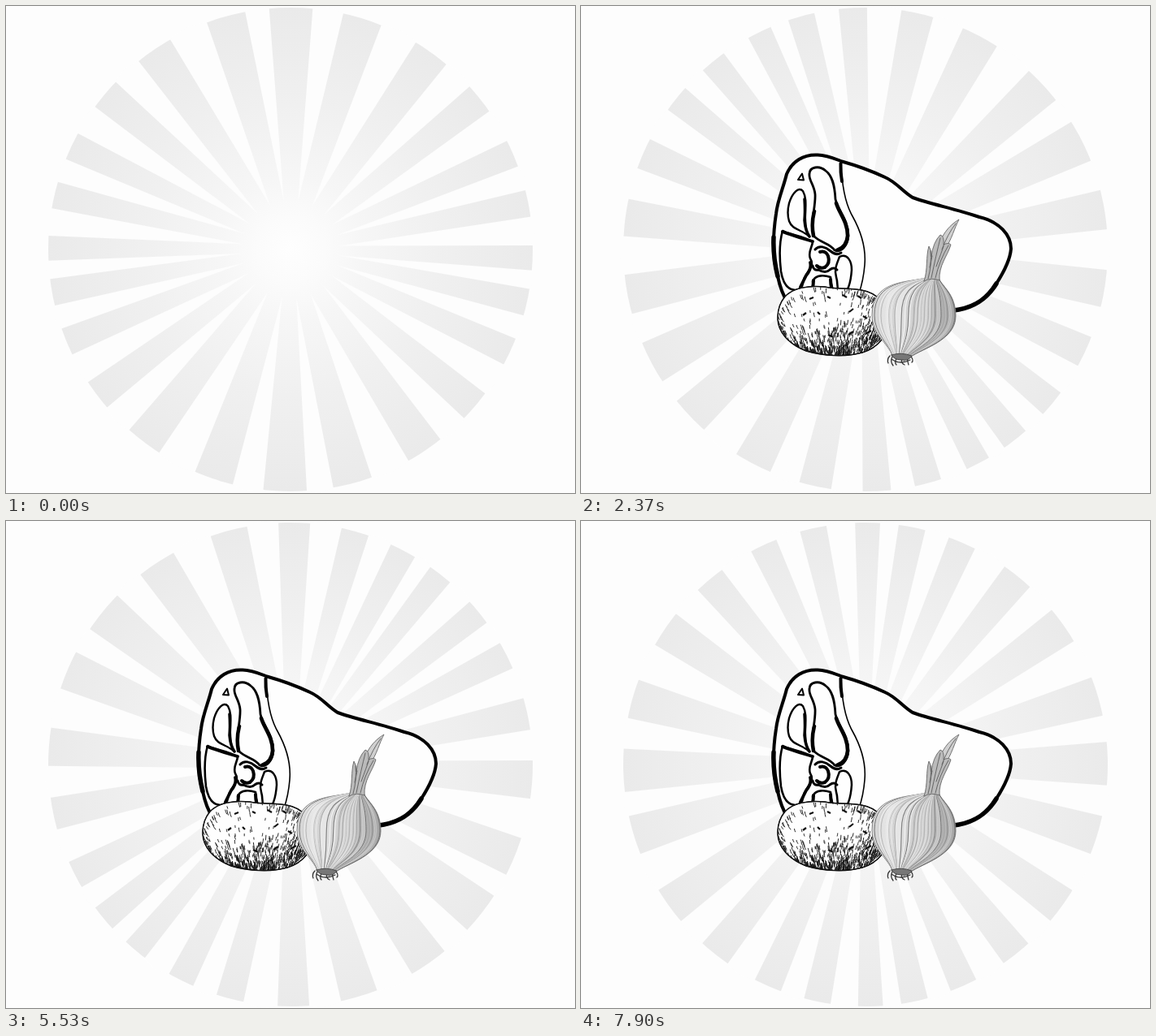
An HTML page for the animation above (8 s loop, 700 by 600 pixels).

```html
<!DOCTYPE html>
<html lang="en">
<head>
<meta charset="utf-8">
<title>Stew ingredients</title>
<style>
html, body { margin: 0; width: 100%; height: 100%; overflow: hidden; background: #fdfdfd; }
svg { display: block; width: 100%; height: 100%; }
</style>
</head>
<body>
<svg viewBox="0 0 700 600">
  <defs>
    <radialGradient id="glow" gradientUnits="userSpaceOnUse" cx="0" cy="0" r="298">
      <stop offset="0" stop-color="#fefefe"/>
      <stop offset=".14" stop-color="#fbfbfb"/>
      <stop offset=".3" stop-color="#f6f6f6"/>
      <stop offset=".6" stop-color="#f0f0f0"/>
      <stop offset="1" stop-color="#eaeaea"/>
    </radialGradient>
    <linearGradient id="skin">
      <stop offset="0" stop-color="#cfcfcf"/>
      <stop offset=".2" stop-color="#ececec"/>
      <stop offset=".5" stop-color="#dedede"/>
      <stop offset=".8" stop-color="#bdbdbd"/>
      <stop offset="1" stop-color="#a0a0a0"/>
    </linearGradient>
    <clipPath id="skinEdge"><path id="spudClip"/></clipPath>
  </defs>

  <g transform="translate(350 300)">
    <g id="burst">
      <circle r="298" fill="url(#glow)"/>
      <path id="gaps" fill="#fdfdfd"/>
    </g>
  </g>

  <g id="ham" fill="none" stroke="#000" stroke-linejoin="round" stroke-linecap="round">
    <path fill="#fefefe" stroke-width="4" d="M290 183.500C301 183 312 188 321 191.500C337 196 357 203 374 211C388 217 396 229 408 236C430 244 461 250 490 260C515 266 529 282 529 299C528 313 520 328 511 342C500 360 486 370 465 374C449 377 431 377 417 383C395 394 374 407 346 409C322 410 298 404 279 392C258 376 247 358 242 333C235 309 236 282 240 256C242 238 249 224 253 207C260 191 274 183 290 183.500Z"/>
    <path stroke-width="5.500" d="M511 342C500 360 486 370 465 374C449 377 431 377 417 383C395 394 374 407 346 409Q324 410 303 404M237 285Q236 309 242 333"/>
    <path stroke-width="1.600" d="M320 193C321 226 326 245 334 259C344 277 351 296 349 319C347 344 339 367 326 385Q316 398 302 404"/>
    <path stroke-width="4" d="M319.500 194Q319 205 321 216"/>
    <path stroke-width="2" d="M267 214L272 206.500L274 214.500Z"/>
    <path stroke-width="2.800" d="M281 207C281 198 293 196 301 203C309 209 312 220 313 238C316 252 329 263 329 283C328 295 321 304 312 301C306 292 297 293 287 284C281 270 289 247 288 232C287 220 280 215 281 207Z"/>
    <path stroke-width="4.500" d="M314 243C318 256 328 266 328 283Q327 297 315 301M286 283Q283 268 287 253"/>
    <path stroke-width="2.400" d="M256 243C260 230 268 222 273 228C279 239 275 250 276 263Q276 277 281 284C271 275 260 276 256 265Q253 255 256 243Z"/>
    <path stroke-width="3.500" d="M275 238Q276 252 275 264Q276 277 281 284"/>
    <path stroke-width="2.600" d="M248 277C260 283 275 283 285 291C284 298 279 303 282 311C287 319 281 324 277 331C270 340 277 347 264 350C253 350 248 339 246 327C244 310 244 291 248 277Z"/>
    <path stroke-width="3.800" d="M248 278Q266 285 285 290M282 316Q284 324 277 332L270 346"/>
    <path stroke-width="3" d="M288 300C293 294 301 297 307 302Q314 308 320 304M285 320Q286 326 292 325Q301 330 306 325Q311 321 315 325"/>
    <path stroke-width="4" d="M294 303Q301 301 304 308Q307 317 300 322Q294 324 290 320"/>
    <path stroke-width="2.500" d="M318 309C328 304 333 315 333 325C332 340 328 353 321 357C313 351 317 343 314 334C311 325 315 317 318 309Z"/>
    <path stroke-width="2.600" d="M285 339C289 330 301 332 307 334C307 347 314 357 314 370C312 384 303 393 293 393C282 391 275 380 277 369C282 359 287 349 285 339Z"/>
    <path stroke-width="4" d="M286 338Q286 349 280 359M307 337Q307 348 313 362"/>
    <path fill="#000" stroke-width="1.500" d="M260 362L266 366L270 372Q262 371 260 362Z"/>
  </g>

  <g id="spud" fill="none" stroke="#111">
    <path id="spudSkin" fill="#fefefe"/>
    <path id="hatch" stroke-width=".9" clip-path="url(#skinEdge)"/>
    <path id="spudLine" stroke-width="1.500"/>
    <path stroke-width="2.200" d="M281 361l5-2M303 358l4 2M322 356l5 3M330 377l5-4M273 381l4-3M304 405l6 3M329 405l6-4M347 382l5 3M350 404l7-4M340 357l5 3M291 377l3 3"/>
  </g>

  <g id="onion" stroke-linecap="round" stroke-linejoin="round">
    <path d="M380 431q-4 4-2 9M383 432q-3 6 1 11M389 433q-4 6-1 9M395 434q-2 6 3 8M401 432q1 7 2 10M405 431q5 5 2 8M382 435q9 6 16 3M386 438q10 3 19-2" fill="none" stroke="#333" stroke-width="1.300"/>
    <path id="bulb" fill="url(#skin)" stroke="#808080" stroke-width="1"/>
    <g id="veins" fill="none"></g>
    <path d="M382 430Q394 426 407 431Q403 438 394 436Q385 436 382 430Z" fill="#777" stroke="#333" stroke-width=".8"/>
    <g fill="#bbb" stroke="#666" stroke-width=".9">
      <path d="M437 304C443 282 452 271 465 263C459 274 457 286 447 301L441 322Z" fill="#d0d0d0"/>
      <path d="M422 339C427 325 424 309 428 296Q432 302 431 309Q433 291 442 282Q447 283 446 294Q452 291 455 294C451 308 440 319 441 338Q431 334 422 339Z"/>
      <path d="M427 336Q432 317 430 302M431 335Q437 306 442 286M436 335Q441 313 452 295M429 322L432 308M437 321Q444 302 446 296M444 300Q451 281 461 268" fill="none" stroke="#5c5c5c"/>
    </g>
  </g>
</svg>
<script>
const $ = id => document.getElementById(id);
const STEP = 790, LOOP = 8000;

let seed = 11;
const rnd = () => (seed = (seed * 16807) % 2147483647) / 2147483647;
const num = v => v.toFixed(1);

// Sunburst: ray centres and widths in degrees, clockwise from the top
const centres = [0.1, 17.3, 35.6, 51.4, 66.6, 79, 92, 102.6, 115, 130.4, 146.3, 165.1,
  181.3, 198.5, 217.3, 233, 247.6, 259.8, 270.3, 283, 295.3, 310, 325.7, 344.5];
const widths = [10.3, 9.4, 8.9, 7.5, 6.6, 6.4, 5.9, 6.4, 6.7, 7.7, 9.1, 9.4];
const turns = [0, 67.6, 159.9, 242, 323.9, 22.6, 81.4, 127.9, 174.3, 221.4, 268.5];

const polar = (deg, r) => {
  const a = deg * Math.PI / 180;
  return num(r * Math.sin(a)) + ' ' + num(-r * Math.cos(a));
};

function drawGaps() {
  $('gaps').setAttribute('d', centres.map((c, i) => {
    const next = (i + 1) % 24;
    const from = c + widths[i % 12] / 2;
    const to = centres[next] + (next ? 0 : 360) - widths[next % 12] / 2;
    const mid = (from + to) / 2;
    return `M${polar(mid, 60)}L${polar(from, 299)}L${polar(mid, 302)}L${polar(to, 299)}Z`;
  }).join(''));
}

function drawSpud() {
  const skin = 'M251 358C261 347 281 344 300 346C313 349 328 347 345 350C364 353 379 369 378 388' +
    'C377 406 366 421 346 427C325 433 297 431 277 425C256 417 242 402 242 384C242 374 245 365 251 358Z';
  for (const id of ['spudSkin', 'spudClip', 'spudLine']) $(id).setAttribute('d', skin);

  let d = '';
  for (let i = 0; i < 3600; i++) {
    const u = rnd() * 2 - 1, v = rnd() * 2 - 1;
    const r = Math.hypot(u, v);
    if (r > 1) continue;
    const low = Math.max(0, v + .2), right = Math.max(0, u - .25);
    const shade = .025 + low * low * .7 + right * right * .9 + Math.max(0, r - .8) * 1.2;
    if (rnd() > shade) continue;
    const x = 310 + u * 69, y = 387 + v * 43;
    const len = 3 + rnd() * 4;
    const lean = u * -.55 + (rnd() - .5) * .3;
    d += `M${num(x)} ${num(y)}q${num(lean * len * .2)} ${num(len * .5)} ${num(lean * len)} ${num(len)}`;
  }
  $('hatch').setAttribute('d', d);
}

// Left and right edge of the bulb from neck to root; k in 0..1 blends between them
const leftEdge = [424, 335, 402, 341, 358, 337, 358, 381, 358, 404, 378, 416, 383, 431];
const rightEdge = [440, 335, 444, 346, 461, 354, 461, 382, 461, 412, 420, 422, 406, 432];

function vein(k) {
  const p = leftEdge.map((v, i) => num(v + (rightEdge[i] - v) * k));
  return `M${p.slice(0, 2)}C${p.slice(2)}`;
}

function drawOnion() {
  const back = [];
  for (let i = 12; i >= 0; i -= 2) back.push(rightEdge[i], rightEdge[i + 1]);
  $('bulb').setAttribute('d', `${vein(0)}L${back.slice(0, 2)}C${back.slice(2)}Z`);
  let lines = '';
  for (let i = 0; i < 50; i++) {
    const k = .015 + i * .97 / 49 + (rnd() - .5) * .015;
    const base = i % 4 === 1 ? 115 : 165;
    const g = Math.round(base + rnd() * 80 - Math.max(0, k - .5) * 50);
    lines += `<path d="${vein(k)}" stroke="rgb(${g},${g},${g})" stroke-width="${num(.5 + rnd() * .8)}"/>`;
  }
  $('veins').innerHTML = lines;
}

function show(t) {
  const i = Math.min(10, Math.floor(t % LOOP / STEP));
  $('burst').setAttribute('transform', `rotate(${turns[i]})`);
  ['ham', 'spud', 'onion'].forEach((id, k) => {
    $(id).style.display = i > k ? '' : 'none';
  });
}

drawGaps();
drawSpud();
drawOnion();
show(0);

let begin;
function tick(now) {
  begin ??= now;
  show(now - begin);
  requestAnimationFrame(tick);
}
requestAnimationFrame(tick);
</script>
</body>
</html>
```
